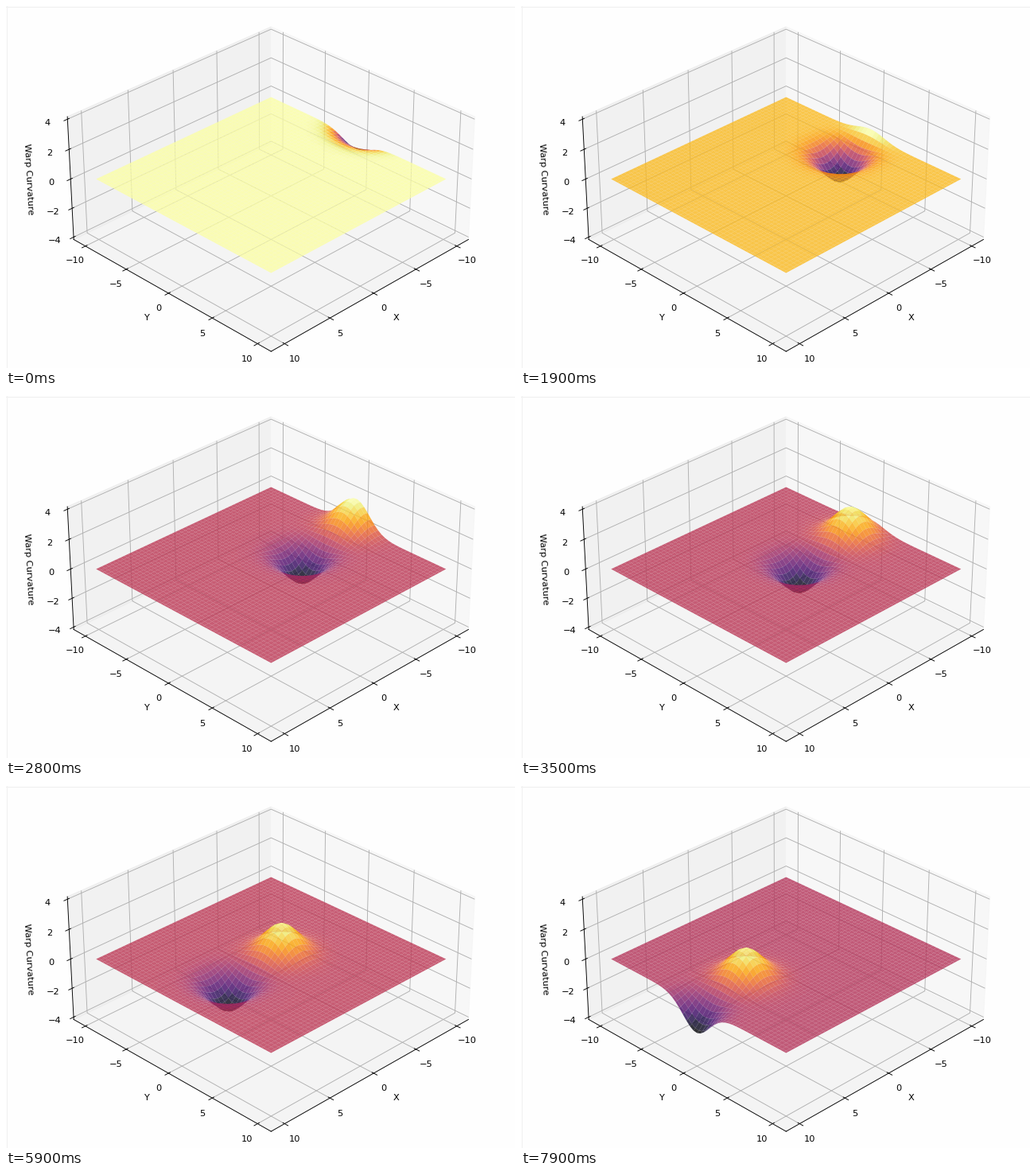
Animation, 640 px wide and 455 px high, one loop 8000 ms. Source, as a matplotlib script:

```python
import numpy as np
import matplotlib.pyplot as plt
from matplotlib.animation import FuncAnimation
from matplotlib.lines import Line2D

W, H, DPI = 640, 455, 82
FRAMES, INTERVAL = 80, 100

# Square 3D axes, larger than the stage; its view centre sits at (CX, CY).
SIDE, CX, CY = 519.1, 333.3, 217.5
OFFSET = SIDE * 0.95 / 1.85
PAD = 25 / 24

AMP, SPREAD, GAP = 2.0, 4.5, 3.0
START, STEP = -15.0, 0.3

fig = plt.figure(figsize=(W / DPI, H / DPI), dpi=DPI, facecolor="#fefefe")
ax = fig.add_axes(
    [(CX - OFFSET) / W, (H - CY - OFFSET) / H, SIDE / W, SIDE / H],
    projection="3d", facecolor="none")

line = np.linspace(-10, 10, 100)
nodes = np.append(line[::2], line[-1])
X, Y = np.meshgrid(nodes, nodes)


def bump(x0):
    return AMP * np.exp(-((X - x0) ** 2 + Y ** 2) / SPREAD)


def warp(i):
    """Dip ahead of the moving centre, hill behind it."""
    n = np.interp(i, [0, 35, 46, 59, 79], [0, 35, 45, 56, 75])
    c = START + STEP * n
    return bump(c - GAP) - bump(c + GAP)


def quads(Z):
    P = np.stack([X, Y, Z], axis=-1)
    cells = np.stack([P[:-1, :-1], P[:-1, 1:], P[1:, 1:], P[1:, :-1]], axis=2)
    return cells.reshape(-1, 4, 3)


surf = ax.plot_surface(X, Y, warp(0), rstride=1, cstride=1, cmap="inferno",
                       edgecolor="none", linewidth=0, alpha=0.8)

ax.set_box_aspect((1, 1, 0.5))
ax.view_init(elev=30, azim=45)
ax.set_xlim(-11 * PAD, 11 * PAD)
ax.set_ylim(-11 * PAD, 11 * PAD)
ax.set_zlim(-4 * PAD, 4 * PAD)
ax.set_xticks(range(-10, 11, 5))
ax.set_yticks(range(-10, 11, 5))
ax.set_zticks(range(-4, 5, 2))
ax.set_xlabel("X")
ax.set_ylabel("Y")
ax.set_zlabel("Warp Curvature")


def edge(x, y, color):
    fig.add_artist(Line2D(x, y, color=color, lw=72 / DPI))


edge([0, 1], [1 - 0.5 / H] * 2, "#efefef")
edge([0.5 / W] * 2, [0, 1], "#f0f0f0")
edge([1 - 0.5 / W] * 2, [0, 1], "#d4d4d4")


def update(i):
    cells = quads(warp(i))
    surf.set_verts(cells)
    surf.set_array(cells[:, :, 2].mean(axis=1))
    surf.autoscale()
    return (surf,)


anim = FuncAnimation(fig, update, frames=FRAMES, interval=INTERVAL,
                     repeat=True, repeat_delay=0, blit=False)
plt.show()
```
